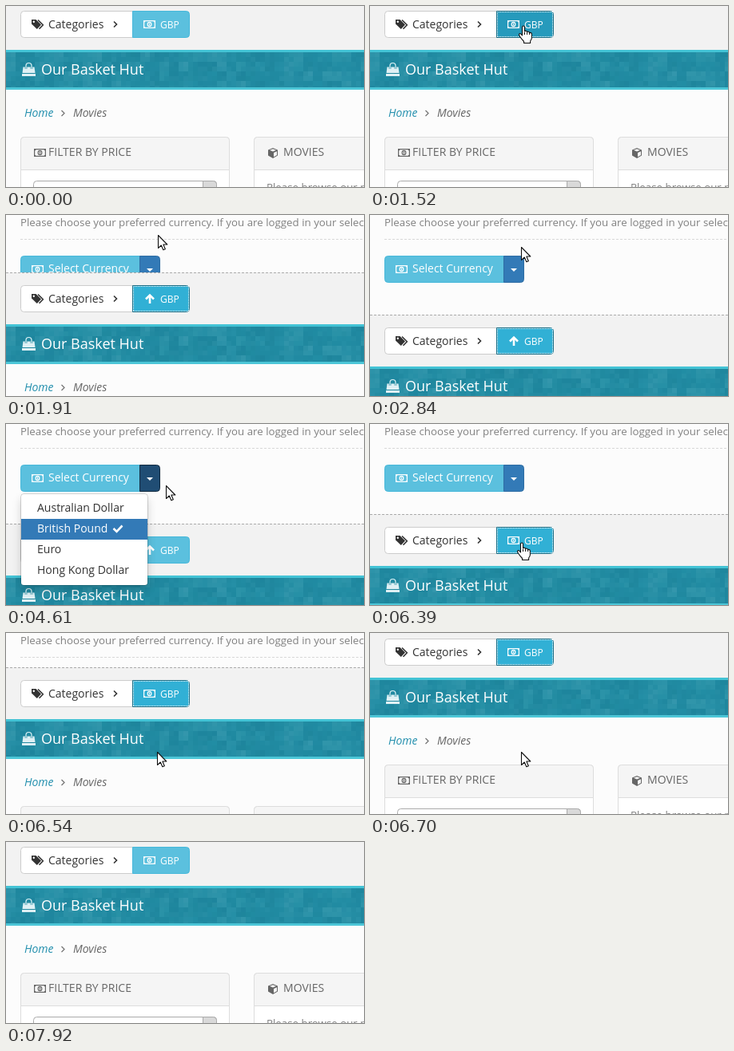
These frames come from a looping animation (448x227 px, 8000 ms). An HTML page with a canvas:

```html
<!DOCTYPE html>
<html lang="en">
<head>
<meta charset="utf-8">
<title>Currency picker</title>
<style>
html, body { margin: 0; width: 100%; height: 100%; overflow: hidden; background: #fcfcfc; }
canvas { display: block; width: 448px; height: 227px; }
</style>
</head>
<body>
<canvas id="stage" width="448" height="227"></canvas>
<script>
const ctx = document.getElementById('stage').getContext('2d');
const W = 448, H = 227, LOOP = 8000, TICKS = 104, DROP = 135;

// Button states: fill and border
const INFO = {
  normal: ['#5bc0de', '#46b8da'],
  hover: ['#31b0d5', '#269abc'],
  focus: ['#31b0d5', '#1b6d85'],
  active: ['#269abc', '#1b6d85']
};
const PRIMARY = {
  normal: ['#337ab7', '#2e6da4'],
  hover: ['#286090', '#204d74'],
  active: ['#204d74', '#122b40']
};

const ARROW = new Path2D('M.5 .5V16.5L4.3 13L6.8 18.8L9.3 17.7L6.9 12H11.8Z');
const HAND = new Path2D('M-1.5 12V1.5Q-1.5 0 0 0Q1.5 0 1.5 1.5V7Q2 6 3.2 6.2Q4.5 6.4 4.6 7.6' +
  'Q5.3 6.8 6.4 7.2Q7.6 7.6 7.6 8.8Q8.6 8 9.7 8.8Q10.5 9.4 10.4 11V15Q10.2 17 8.6 19V21.5H.6V19.5' +
  'Q-2 17-4.2 13.5Q-6.2 11-5 9.8Q-4 9-2.6 10.6Z');

// Pointer path: tick, x, y
const POINTER = [
  [6, 342, 212], [14, 192, 25], [22, 192, 25], [23, 190, 25], [36, 190, 25],
  [37, 189, 40], [40, 186, 65], [59, 186, 65], [60, 200, 77], [62, 203, 98],
  [74, 203, 98], [75, 199, 121], [77, 190, 149], [92, 189, 149], [97, 406, 222]
];

const swing = x => 0.5 - Math.cos(Math.PI * Math.min(1, Math.max(0, x))) / 2;
const between = (k, a, b) => k >= a && k < b;

function pointerAt(k) {
  if (!between(k, 6, 98)) return null;
  const i = POINTER.findIndex(p => p[0] >= k);
  const b = POINTER[i], a = POINTER[Math.max(0, i - 1)];
  const span = b[0] - a[0];
  const u = span ? (k - a[0]) / span : 0;
  const e = span > 4 ? swing(u) : u;
  return { x: Math.round(a[1] + (b[1] - a[1]) * e), y: Math.round(a[2] + (b[2] - a[2]) * e) };
}

function rect(x, y, w, h, fill) {
  ctx.fillStyle = fill;
  ctx.fillRect(x, y, w, h);
}

function box(x, y, w, h, radii, [fill, border]) {
  ctx.beginPath();
  ctx.roundRect(x + 0.5, y + 0.5, w - 1, h - 1, radii);
  ctx.fillStyle = fill;
  ctx.fill();
  ctx.lineWidth = 1;
  ctx.strokeStyle = border;
  ctx.stroke();
}

function text(str, x, y, color, size = 14, style = '') {
  ctx.font = `${style} ${size}px "Open Sans", sans-serif`;
  ctx.fillStyle = color;
  ctx.fillText(str, x, y);
}

function line(points, color, width = 1, dash = []) {
  ctx.beginPath();
  points.forEach(([x, y]) => ctx.lineTo(x, y));
  ctx.strokeStyle = color;
  ctx.lineWidth = width;
  ctx.setLineDash(dash);
  ctx.stroke();
  ctx.setLineDash([]);
}

function shape(points, color) {
  ctx.beginPath();
  points.forEach(([x, y]) => ctx.lineTo(x, y));
  ctx.closePath();
  ctx.fillStyle = color;
  ctx.fill();
}

function dot(x, y, r, color) {
  ctx.beginPath();
  ctx.arc(x, y, r, 0, 7);
  ctx.fillStyle = color;
  ctx.fill();
}

function dottedFrame(x, y, w, h, color) {
  const r = x + w, b = y + h;
  for (const cy of [y + 0.5, b - 0.5]) line([[x, cy], [r, cy]], color, 1, [1, 1]);
  for (const cx of [x + 0.5, r - 0.5]) line([[cx, y], [cx, b]], color, 1, [1, 1]);
}

const chevron = (x, y, color, width) =>
  line([[x, y - 3.5], [x + 3.5, y], [x, y + 3.5]], color, width);

function moneyIcon(x, y, color) {
  ctx.save();
  ctx.beginPath();
  ctx.rect(x, y, 15, 10);
  ctx.clip();
  ctx.strokeStyle = color;
  ctx.lineWidth = 1.2;
  ctx.strokeRect(x + 0.6, y + 0.6, 13.8, 8.8);
  for (const cx of [0, 15]) for (const cy of [0, 10]) dot(x + cx, y + cy, 2.6, color);
  ctx.beginPath();
  ctx.ellipse(x + 7.5, y + 5, 2.3, 2.7, 0, 0, 7);
  ctx.stroke();
  rect(x + 7, y + 3.5, 1, 3, color);
  ctx.restore();
}

function upIcon(x, y, color) {
  line([[x, y + 6], [x, y - 4]], color, 2.6);
  line([[x - 5, y + 0.5], [x, y - 4.5], [x + 5, y + 0.5]], color, 2.6);
}

function tagsIcon(x, y, color, hole) {
  line([[x + 8, y + 0.5], [x + 14.3, y + 6.8], [x + 9.5, y + 11.8]], color, 1.6);
  shape([[x, y], [x + 5.5, y], [x + 12, y + 6.5], [x + 6.8, y + 12], [x, y + 5.5]], color);
  dot(x + 2.8, y + 2.8, 1.2, hole);
}

function bagHandle(x, y, color, width) {
  ctx.beginPath();
  ctx.moveTo(x + 5, y + 8);
  ctx.lineTo(x + 5, y + 4);
  ctx.arc(x + 8.5, y + 4, 3.5, Math.PI, 0);
  ctx.lineTo(x + 12, y + 8);
  ctx.strokeStyle = color;
  ctx.lineWidth = width;
  ctx.stroke();
}

function bagIcon(x, y, color, gap) {
  shape([[x + 1.5, y + 5.5], [x + 15.5, y + 5.5], [x + 16.5, y + 13], [x + 0.5, y + 13]], color);
  bagHandle(x, y, gap, 2.6);
  bagHandle(x, y, color, 1.2);
  rect(x, y + 14, 17, 3, color);
}

function cubeIcon(x, y, color) {
  shape([[x + 6, y], [x + 12, y + 2.5], [x + 12, y + 9.5], [x + 6, y + 13], [x, y + 9.5], [x, y + 2.5]], color);
  shape([[x + 6, y + 1.2], [x + 10, y + 2.8], [x + 6, y + 4.5], [x + 2, y + 2.8]], '#f5f5f5');
  shape([[x + 7, y + 6], [x + 11, y + 4.3], [x + 11, y + 9], [x + 7, y + 11.3]], '#f5f5f5');
}

// Mosaic of faint squares in two sizes
function drawBand() {
  rect(0, 55, W, 50, '#218da4');
  const noise = (a, b) => {
    const v = Math.sin(a * 12.99 + b * 78.23) * 43758.5;
    return v - Math.floor(v);
  };
  for (const [size, strength] of [[12, 0.05], [6, 0.03]]) {
    for (let y = 58; y < 103; y += size) {
      for (let x = 0; x < W; x += size) {
        const n = noise(x + size, y) - 0.5;
        const tone = n > 0 ? '255,255,255' : '0,50,70';
        rect(x, y, size, Math.min(size, 102 - y), `rgba(${tone},${Math.abs(n) * 2 * strength})`);
      }
    }
  }
  rect(0, 55, W, 3, '#43c3d5');
  rect(0, 102, W, 3, '#4cc6d7');
  bagIcon(20, 71, '#dff0f4', '#218da4');
  text('Our Basket Hut', 44, 86, '#fff', 18);
}

function drawPicker(caretColors) {
  text('Please choose your preferred currency. If you are logged in your selection', 18, 14, '#808080', 13.3);
  line([[18, 30.5], [W, 30.5]], '#d8d8d8', 1, [3, 2]);
  box(18, 51, 150, 34, [4, 0, 0, 4], INFO.normal);
  moneyIcon(32, 63, '#fff');
  text('Select Currency', 53, 72, '#fff');
  box(167, 51, 26, 34, [0, 4, 4, 0], caretColors);
  shape([[176, 67], [184, 67], [180, 71]], '#fff');
}

function drawHeader(button) {
  rect(0, -10, W, 65, '#f2f2f2');
  line([[0, -9.5], [W, -9.5]], '#aaa', 1, [3, 2]);
  box(18, 6, 141, 34, [4, 0, 0, 4], ['#fff', '#ccc']);
  tagsIcon(32, 17, '#333', '#fff');
  text('Categories', 53, 28, '#333');
  chevron(135, 23, '#333', 1.6);
  box(158, 6, 72, 34, [0, 4, 4, 0], button.colors);
  if (button.focus) dottedFrame(159, 7, 70, 32, '#fff');
  if (button.up) upIcon(180, 23, '#fff');
  else moneyIcon(172, 18, '#fff');
  text('GBP', 193, 27.5, '#fff', 12);
}

function drawPanel(x, w, title, titleX) {
  box(x, 164, w, 120, 4, ['#fff', '#ddd']);
  box(x, 164, w, 42, [4, 4, 0, 0], ['#f5f5f5', '#ddd']);
  text(title, titleX, 188, '#666');
}

function drawContent() {
  rect(0, 105, W, H, '#fcfcfc');
  text('Home', 23, 139, '#2490ae', 14, 'italic');
  chevron(69.5, 134.5, '#777', 1.3);
  text('Movies', 84, 139, '#666', 14, 'italic');
  drawPanel(18, 262, 'FILTER BY PRICE', 53);
  moneyIcon(35, 179, '#666');
  box(34, 219, 230, 34, 4, ['#fff', '#aaa']);
  box(246, 219, 18, 34, [0, 4, 4, 0], ['#d9d9d9', '#aaa']);
  drawPanel(310, 262, 'MOVIES', 347);
  cubeIcon(328, 178, '#666');
  text('Please browse our movies', 326, 232, '#808080', 13.3);
}

function drawMenu() {
  ctx.save();
  ctx.shadowColor = 'rgba(0,0,0,.18)';
  ctx.shadowBlur = 12;
  ctx.shadowOffsetY = 6;
  ctx.fillStyle = '#fff';
  ctx.beginPath();
  ctx.roundRect(19, 88, 158, 114, 3);
  ctx.fill();
  ctx.restore();
  box(18, 87, 160, 116, 4, ['transparent', 'rgba(0,0,0,.15)']);
  ['Australian Dollar', 'British Pound', 'Euro', 'Hong Kong Dollar'].forEach((name, i) => {
    const chosen = i === 1, y = 93 + i * 26;
    if (chosen) {
      rect(19, y, 158, 26, PRIMARY.normal[0]);
      line([[134.5, y + 12], [138.5, y + 16], [145.5, y + 8.5]], '#fff', 2.6);
    }
    text(name, 39, y + 17, chosen ? '#fff' : '#333');
  });
}

function drawPointer(p, isHand) {
  ctx.save();
  ctx.translate(p.x, p.y);
  const path = isHand ? HAND : ARROW;
  ctx.fillStyle = '#fff';
  ctx.fill(path);
  ctx.strokeStyle = '#111';
  ctx.lineWidth = 1.1;
  ctx.lineJoin = 'round';
  ctx.stroke(path);
  if (isHand) {
    for (const x of [1.5, 4.6, 7.6]) line([[x, 8], [x, 11]], '#111');
  }
  ctx.restore();
}

function render(k) {
  const open = swing((k - 22) * 0.19) - swing((k - 82) * 0.19);
  const drop = Math.round(DROP * open);
  const p = pointerAt(k);
  const over = (x, y, w, h) => p && p.x >= x && p.x < x + w && p.y >= y && p.y < y + h;
  const overButton = over(158, 6 + drop, 72, 34);
  const overCaret = drop > 85 && over(167, 51, 26, 34);

  const pressed = between(k, 20, 22) || k === 81;
  const focus = between(k, 20, 44) || between(k, 81, 103);
  const state = pressed ? 'active' : focus ? 'focus' : overButton ? 'hover' : 'normal';
  const button = { colors: INFO[state], focus, up: between(k, 22, 82) };
  const caret = between(k, 44, 67) ? PRIMARY.active
    : overCaret || between(k, 67, 69) ? PRIMARY.hover : PRIMARY.normal;

  rect(0, 0, W, H, '#fcfcfc');
  drawPicker(caret);
  ctx.save();
  ctx.translate(0, drop);
  drawHeader(button);
  drawBand();
  drawContent();
  ctx.restore();
  if (between(k, 46, 69)) drawMenu();
  if (p) drawPointer(p, overButton || overCaret);
}

// The screen refreshes in discrete ticks, slightly ahead of the clock
function loop() {
  const t = performance.now() % LOOP;
  render(Math.min(TICKS - 1, Math.floor((t + 28) * TICKS / LOOP)));
  requestAnimationFrame(loop);
}
loop();
</script>
</body>
</html>
```
